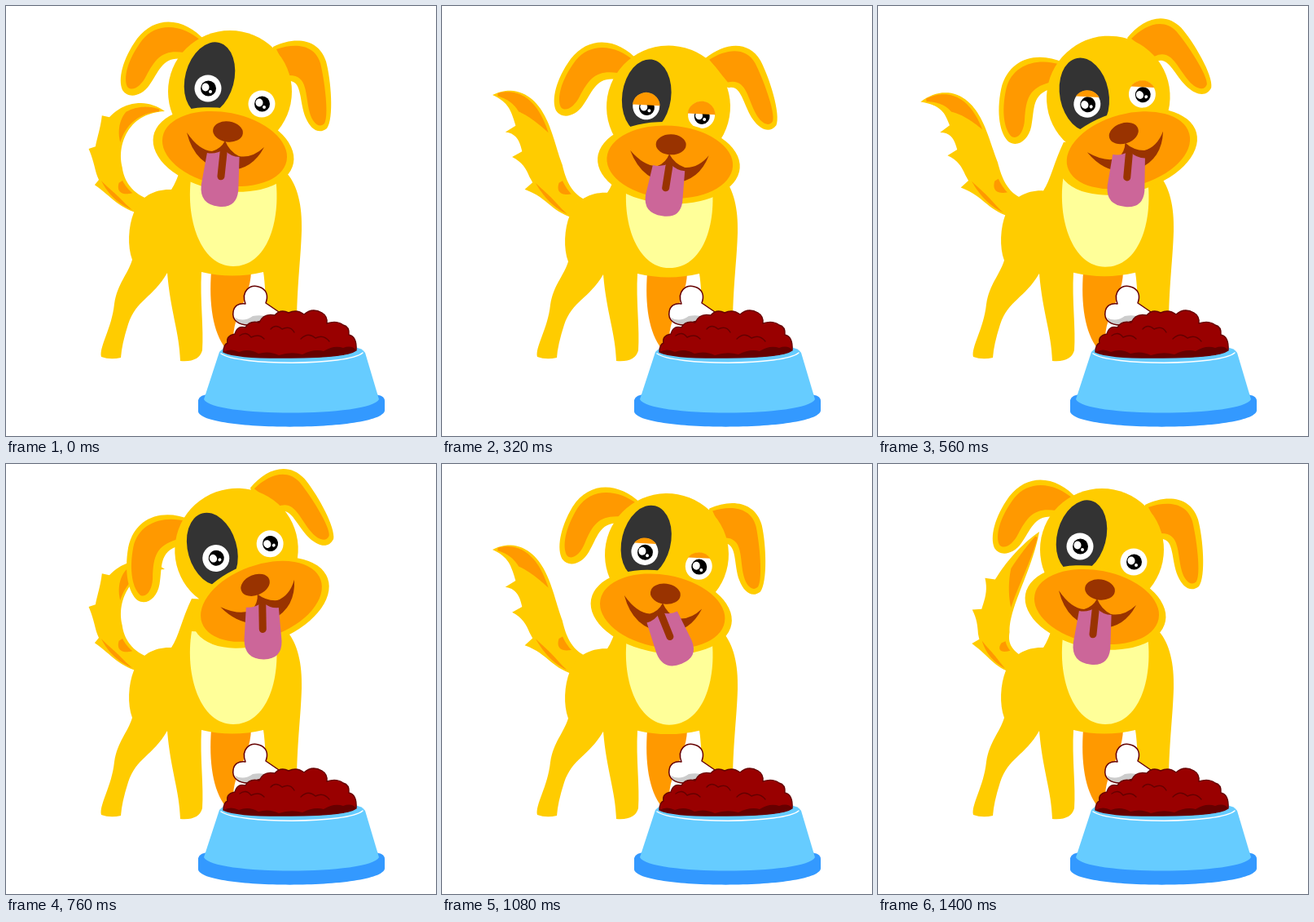
Write an HTML page with a canvas that moves like this. It is 528 px wide and 527 px high and loops after 1440 ms.

```html
<!DOCTYPE html>
<html lang="en">
<head>
<meta charset="utf-8">
<title>Dog with a bowl</title>
<style>
html, body { margin: 0; height: 100%; overflow: hidden; background: #fff; }
canvas { display: block; }
</style>
</head>
<body>
<canvas id="stage" width="528" height="527"></canvas>
<script>
const ctx = document.getElementById('stage').getContext('2d');
const LOOP = 1440, STEP = 40;
const YELLOW = '#fc0', ORANGE = '#f90', BROWN = '#930', DARK = '#333';

// time, head x, head y, tilt, eyelid, tongue angle, left ear, right ear
const HEAD = [
  [0, 275, 105, 0, 0, 6, 0, 0],
  [200, 275, 105, 0, 0, 6, 0, 0],
  [320, 278, 123.5, -7, .46, 9, 7, -6],
  [380, 280, 129, -10, .72, 10, 5, -8],
  [440, 281, 128, -13, .76, 10, 3, -10],
  [600, 283, 107, -30, .05, 3, 2, 4],
  [660, 283, 105, -31, 0, -1, 5, 6],
  [760, 283, 105, -31, 0, -1, 5, 6],
  [920, 282, 130, -13, .76, -17, 7, -10],
  [1080, 276, 111, -1, .2, -22, -4, 3],
  [1150, 275, 105, 0, 0, 6, 0, 0],
  [1440, 275, 105, 0, 0, 6, 0, 0]
];

// time, three bezier points of the tail spine, width; two wags per loop
const CURLED = [96, 225, 119, 108, 195, 129, .76];
const OUT = [100, 222, 137, 100, 62, 103, 1];
const LOW = [103, 232, 136, 84, 56, 168, .95];
const TAIL = [
  [0, ...CURLED],
  [40, ...CURLED],
  [200, 97, 222, 105, 114, 146, 71, .86],
  [320, ...OUT],
  [360, ...OUT],
  [440, ...LOW],
  [480, ...LOW],
  [580, ...OUT],
  [680, 112, 220, 156, 150, 198, 83, .9],
  [720, ...CURLED]
];

// Monotone cubic interpolation of every column at time t
function pose(keys, t) {
  const i = Math.max(1, keys.findIndex(k => k[0] > t)) - 1;
  const a = keys[i], b = keys[i + 1], span = b[0] - a[0], u = (t - a[0]) / span;
  const slope = (j, c) => {
    const p = keys[j - 1], k = keys[j], n = keys[j + 1];
    if (!p || !n || (k[c] - p[c]) * (n[c] - k[c]) <= 0) return 0;
    return (n[c] - p[c]) / (n[0] - p[0]) * span;
  };
  return a.slice(1).map((v, j) => {
    const c = j + 1, d = b[c] - v, m = slope(i, c), n = slope(i + 1, c);
    return v + u * (m + u * (3 * d - 2 * m - n + u * (m + n - 2 * d)));
  });
}

const rad = deg => deg * Math.PI / 180;

function fill(color, path) {
  ctx.fillStyle = color;
  ctx.fill(new Path2D(path));
}

function line(color, width, path) {
  ctx.strokeStyle = color;
  ctx.lineWidth = width;
  ctx.lineCap = ctx.lineJoin = 'round';
  ctx.stroke(new Path2D(path));
}

function oval(color, x, y, rx, ry = rx, tilt = 0) {
  ctx.fillStyle = color;
  ctx.beginPath();
  ctx.ellipse(x, y, rx, ry, rad(tilt), 0, 7);
  ctx.fill();
}

function turned(x, y, deg, draw, stretch = 1) {
  ctx.save();
  ctx.translate(x, y);
  ctx.rotate(rad(deg));
  ctx.scale(1, stretch);
  ctx.translate(-x, -y);
  draw();
  ctx.restore();
}

function drawTail([x1, y1, x2, y2, x3, y3, size]) {
  const bez = (a, b, c, d, u) => {
    const v = 1 - u;
    return v * v * v * a + 3 * v * v * u * b + 3 * v * u * u * c + u * u * u * d;
  };
  const spine = u => [bez(172, x1, x2, x3, u), bez(246, y1, y2, y3, u)];
  const width = u => 21 * size * (1 - u ** 5) * (.6 + .4 * Math.min(1, u * 3));
  const tuft = u => u > .12 && u < .66 ? 17 * size ** 2 * ((u - .12) / .18 % 1) ** 3 : 0;
  const left = u => -1.05 * width(u) - tuft(u);

  // Band along the spine between two side offsets
  function band(color, from, to, near, far) {
    const pts = [], n = 60;
    for (let i = 0; i <= 2 * n + 1; i++) {
      const s = (i <= n ? i : 2 * n + 1 - i) / n, u = from + (to - from) * s;
      const [ax, ay] = spine(u - .005), [bx, by] = spine(u + .005);
      const k = (i <= n ? near : far)(u, s) / Math.hypot(bx - ax, by - ay);
      pts.push([(ax + bx) / 2 - (by - ay) * k, (ay + by) / 2 + (bx - ax) * k]);
    }
    fill(color, 'M' + pts.join('L') + 'Z');
  }

  band(YELLOW, 0, 1, left, width);
  band(ORANGE, .55, .97, u => .8 * width(u),
    (u, s) => width(u) * (.8 - 1.25 * Math.min(1, s * 2)));
  band(ORANGE, .06, .29, u => -.9 * width(u), (u, s) => 5 * Math.sin(s * 3.14) - .9 * width(u));
  band(ORANGE, .11, .23, u => .7 * width(u), (u, s) => .7 * width(u) - 10 * Math.sin(s * 2.6));
}

function drawBody() {
  fill(ORANGE, 'M252 325C249 365 254 400 270 420L282 425C270 385 300 365 301 325Z');
  fill(YELLOW, `M203 225C212 212 216 190 228 165L330 170L345 205C358 220 364 245 363 275
    C362 310 358 335 357 385L319 385Q319 345 316 326Q278 335 240 326C238 360 243 395 241 422
    Q237 437 214 435C213 400 202 375 198 327C180 358 160 360 150 390Q142 415 141 431
    Q128 434 117 430C114 418 130 395 133 365C137 340 149 330 155 311
    C149 295 150 270 157 253C165 232 185 224 203 225Z`);
  fill('#ff9', 'M228 205C219 260 239 319 279 319C320 319 338 265 331 210Z');
}

function drawEye(x, y, lid, tilt) {
  const gaze = y + 4 * lid;
  oval('#fff', x, y, 16.5);
  oval('#000', x + .5, gaze, 9.5);
  oval('#fff', x - 3, gaze - 1.5, 4.5, 5);
  oval('#fff', x + 3, gaze + 4, 2);
  if (lid < .01) return;
  // The lid edge stays nearly level while the head tilts
  const half = Math.acos(1 - 2 * lid), up = -Math.PI / 2 - rad(tilt - 3);
  ctx.fillStyle = ORANGE;
  ctx.beginPath();
  ctx.arc(x, y, 17, up - half, up + half);
  ctx.fill();
}

function drawMuzzle(tongue, dip) {
  oval(YELLOW, 267, 176, 87.5, 50, 11);
  oval(ORANGE, 268.5, 175, 77.5, 44.5, 11);
  oval(BROWN, 272.5, 154, 18.5, 12.5, 8);
  fill(BROWN, `M222 155Q237 177 253 178Q264 175 269 165Q274 178 286 184
    Q302 187 317 173Q301 203 270 201Q232 196 222 155Z`);
  turned(267, 180, tongue, () => {
    fill('#c69', `M247 182Q258 183 267 176Q277 184 287 183L290 224Q290 246 268 246
      Q244 246 244 222Z`);
    line(BROWN, 9, 'M267 180V209');
  }, 1 - .09 * dip);
}

function drawHead([x, y, tilt, lid, tongue, earL, earR]) {
  const dip = (y - 105) / 25;
  ctx.save();
  ctx.translate(x, y);
  ctx.rotate(rad(tilt));
  ctx.translate(-275, -105);
  turned(225, 52, earL, () => {
    fill(YELLOW, `M244 42C222 17 186 8 161 40C143 65 137 90 143 103C150 114 166 111 176 97
      C189 79 192 61 219 65Z`);
    fill(ORANGE, `M240 43C218 23 186 18 167 42C149 66 144 88 149 99C155 106 166 98 172 86
      C184 63 193 53 219 57Z`);
  });
  turned(340, 55, earR, () => {
    fill(YELLOW, `M328 50C355 37 384 40 393 68C399 90 403 138 394 150C384 158 374 151 368 137
      C360 118 364 92 348 92L325 80Z`);
    fill(ORANGE, `M332 53C355 45 379 47 386 70C391 90 397 134 391 144C384 151 376 142 373 131
      C367 108 371 85 348 85Z`);
  });
  oval(YELLOW, 275, 105, 76, 75);
  oval(DARK, 250, 89, 30, 45.5, 15);
  drawEye(248, 101, lid, tilt);
  drawEye(314, 120, lid, tilt);
  ctx.translate(0, -3.5 * dip);
  drawMuzzle(tongue - tilt, dip);
  ctx.restore();
}

function drawBowl() {
  fill('#39f', 'M236 483Q238 476 250 476H452Q465 477 465 484V496C460 522 240 522 236 497Z');
  fill('#6cf', `M262 424Q266 418 280 418H425Q438 419 441 425L458 482
    C448 504 252 504 243 482Z`);
  line('#fff', 1.5, 'M264 426C285 441 420 441 438 425');

  const bone = `M294 365C288 349 300 341 310 344C321 347 322 356 319 364L338 377L318 388
    C309 383 307 391 297 391C286 391 277 385 279 375C280 367 286 364 294 365Z`;
  fill('#fff', bone);
  fill('#ccc', 'M281 382Q292 388 303 380Q313 378 322 381L318 388Q307 385 301 390Q286 394 281 382Z');
  line('#600', 1.5, bone);

  const meat = `M267 424Q267 415 272 413Q270 404 281 402Q284 391 294 394Q299 385 311 388
    Q316 376 330 379Q337 371 347 376Q357 371 366 378Q376 369 388 376Q395 380 394 389
    Q406 385 414 391Q422 393 421 403Q431 405 430 422Q418 431 350 431Q285 432 267 424Z`;
  fill('#900', meat);
  fill('#600', `M267 424Q276 419 286 424Q298 419 310 426Q323 422 335 428Q350 423 364 427
    Q378 420 390 423Q403 415 414 419Q425 415 430 422Q418 431 350 431Q285 432 267 424Z`);
  line('#600', 1.4, meat);
  line('#600', 1.4, `M287 404Q295 398 301 406Q311 401 317 408M325 396Q331 389 339 396
    Q349 391 354 400M362 408Q371 399 380 407Q390 402 397 411`);
}

function draw() {
  const t = Math.floor(performance.now() % LOOP / STEP) * STEP;
  const head = pose(HEAD, t);
  ctx.clearRect(0, 0, 528, 527);
  // The body sinks toward the feet as the head dips
  ctx.save();
  ctx.translate(0, 433);
  ctx.scale(1, 1 - (head[1] - 105) * .001);
  ctx.translate(0, -433);
  drawTail(pose(TAIL, t % 720));
  drawBody();
  ctx.restore();
  drawHead(head);
  drawBowl();
  requestAnimationFrame(draw);
}
draw();
</script>
</body>
</html>
```
